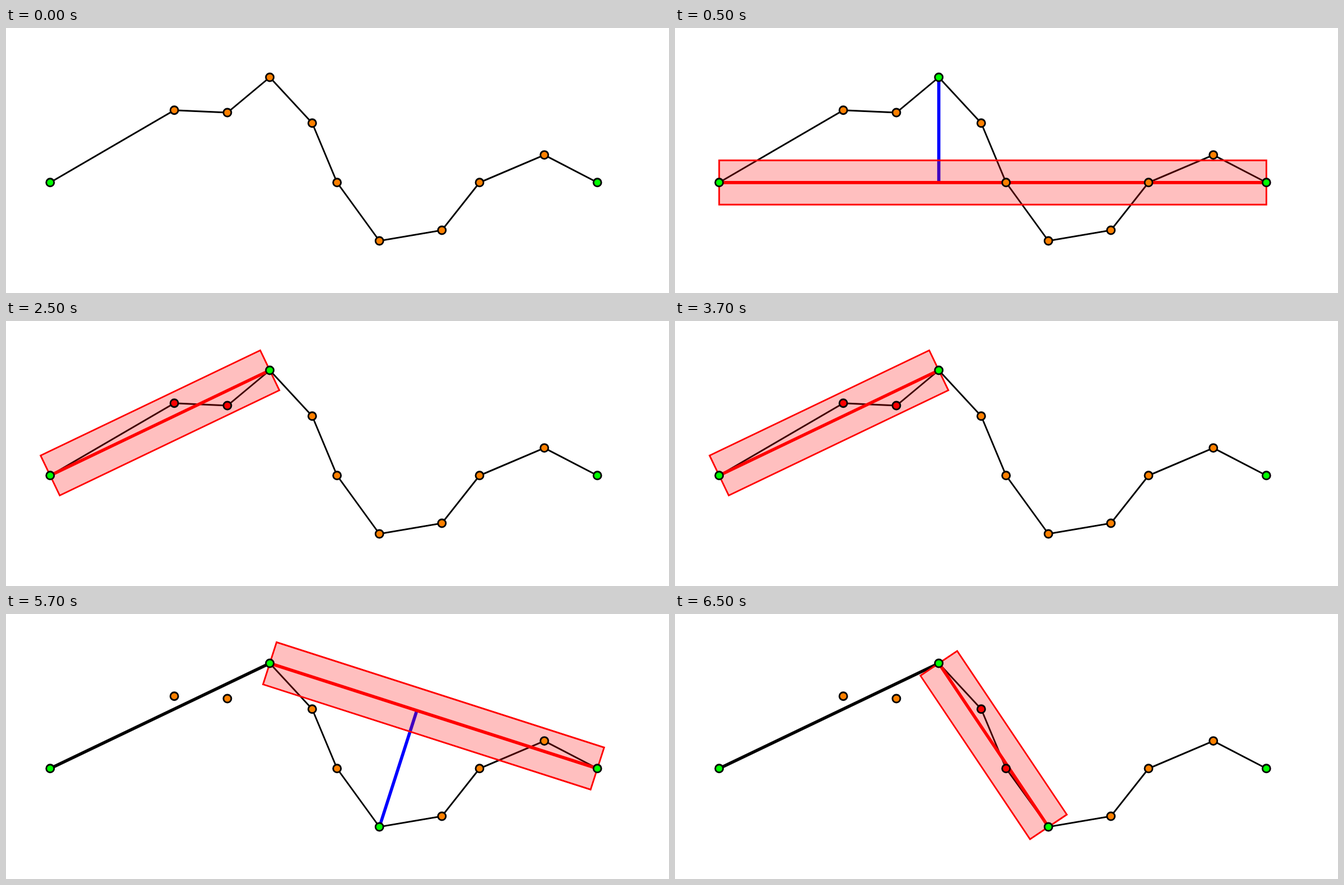
Write an HTML page with a canvas that moves like this. It is 1183 px wide and 473 px high and loops after 8 s.

```html
<!DOCTYPE html>
<html lang="en">
<head>
<meta charset="utf-8">
<title>Line simplification</title>
<style>
html, body { margin: 0; width: 100%; height: 100%; overflow: hidden; background: #fff; }
canvas { display: block; }
</style>
</head>
<body>
<canvas id="stage" width="1183" height="473"></canvas>
<script>
const ctx = document.getElementById('stage').getContext('2d');
const LOOP = 8000, TOLERANCE = 39.5, THIN = 2.9, THICK = 5.7;
const points = [
  [78.8, 275.8], [300.3, 146.7], [395, 151], [470.7, 88], [546.4, 169.8], [590.7, 275.8],
  [666.3, 380], [777.8, 361], [845, 275.8], [960.6, 226.6], [1055.2, 275.8]
];

// span: tested chord, far: most distant point, kept: accepted points,
// drop: points inside the tolerance, done: index where the finished line ends
const steps = [
  { at: 0, kept: [0, 10] },
  { at: 500, span: [0, 10], far: 3, kept: [0, 3, 10] },
  { at: 2500, span: [0, 3], kept: [0, 3, 10], drop: [1, 2] },
  { at: 4500, span: [3, 10], far: 6, kept: [0, 3, 6, 10], done: 3 },
  { at: 6500, span: [3, 6], kept: [0, 3, 6, 10], drop: [4, 5], done: 3 }
];

function line(path, color, width) {
  ctx.beginPath();
  path.forEach(p => ctx.lineTo(...p));
  ctx.strokeStyle = color;
  ctx.lineWidth = width;
  ctx.stroke();
}

function dot([x, y], fill) {
  ctx.beginPath();
  ctx.arc(x, y, 7, 0, 2 * Math.PI);
  ctx.fillStyle = fill;
  ctx.fill();
  ctx.strokeStyle = '#000';
  ctx.lineWidth = THIN;
  ctx.stroke();
}

function drawTest([from, to], far) {
  const a = points[from], b = points[to];
  const dx = b[0] - a[0], dy = b[1] - a[1], length = Math.hypot(dx, dy);

  if (far) {
    const p = points[far];
    const k = ((p[0] - a[0]) * dx + (p[1] - a[1]) * dy) / length ** 2;
    line([p, [a[0] + k * dx, a[1] + k * dy]], '#00f', THICK);
  }

  ctx.save();
  ctx.translate(...a);
  ctx.rotate(Math.atan2(dy, dx));
  ctx.beginPath();
  ctx.rect(0, -TOLERANCE, length, 2 * TOLERANCE);
  ctx.fillStyle = 'rgba(255, 0, 0, .25)';
  ctx.fill();
  ctx.strokeStyle = '#f00';
  ctx.lineWidth = THIN;
  ctx.stroke();
  ctx.restore();

  line([a, b], '#f00', THICK);
}

function draw(now) {
  const time = now % LOOP;
  const { span, far, kept, drop = [], done = 0 } = steps.filter(s => s.at <= time).pop();
  ctx.clearRect(0, 0, 1183, 473);
  line(points.slice(done), '#000', THIN);
  if (done) line([points[0], points[done]], '#000', THICK);
  if (span) drawTest(span, far);
  points.forEach((p, i) =>
    dot(p, kept.includes(i) ? '#0f0' : drop.includes(i) ? '#f00' : '#ff8000'));
}

const start = performance.now();
function tick() {
  draw(performance.now() - start);
  requestAnimationFrame(tick);
}
tick();
</script>
</body>
</html>
```
